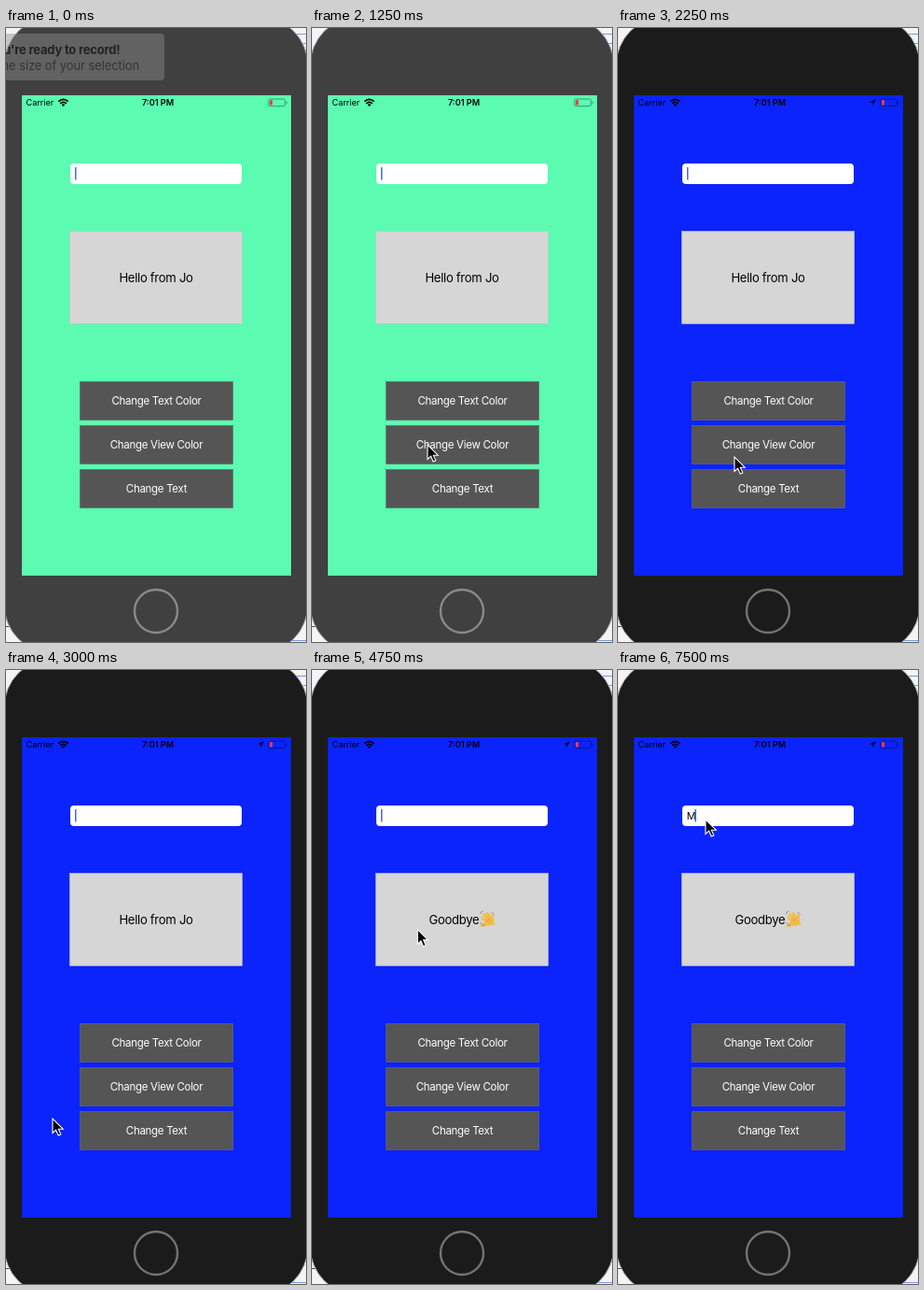
Write an HTML page that moves like this. It is 322 px wide and 657 px high and loops after 8000 ms.

```html
<!DOCTYPE html>
<html lang="en">
<head>
<meta charset="utf-8">
<style>
  html, body { margin: 0; height: 100%; overflow: hidden; background: #f4f4f4; }
  svg { display: block; width: 322px; height: 657px; font-family: Inter, Roboto, sans-serif; }
  .label { font-size: 13.1px; letter-spacing: -.3px; }
  .button { font-size: 11.5px; letter-spacing: -.3px; fill: #fff; }
  .status { font-size: 9.1px; }
  .mid { text-anchor: middle; }
</style>
</head>
<body>
<svg viewBox="0 0 322 657">
  <path d="M306 6.5H322M310 16.5H322M306 655.5H322" stroke="#6f9be8"/>
  <path d="M0 640.5H4" stroke="#444"/>
  <rect id="body" x="-2" y="-12" width="326" height="681" rx="52" stroke="#b5b5b5"/>
  <circle id="home" cx="161" cy="624" r="23" fill="none" stroke-width="2.4"/>
  <rect id="screen" x="17" y="72" width="289" height="514"/>

  <text class="status" x="21.5" y="83">Carrier</text>
  <g fill="none" stroke="#000" stroke-width="1.6">
    <path d="M56.3 78.6Q61.5 74 66.7 78.6M58.2 80.8Q61.5 78 64.8 80.8"/>
  </g>
  <path d="M59.6 82Q61.5 80.4 63.4 82L61.5 84Z"/>
  <text class="status mid" x="163" y="83" font-weight="600">7:01 PM</text>
  <path id="arrow" d="M277 76L270 79.4H273.4V83Z"/>
  <g id="battery">
    <rect x="281.8" y="76" width="17.6" height="7.6" rx="1.6" fill="none"/>
    <path d="M301.2 78.5V81.2" fill="none"/>
  </g>
  <rect x="283" y="77.2" width="3" height="5.2" fill="#fb3b3f"/>

  <rect x="69" y="145" width="184" height="22" rx="4" fill="#fff"/>
  <text id="typed" x="73.8" y="159.8" font-size="11">M</text>
  <rect id="caret" y="149" width="1.5" height="13.5" fill="#4368e8"/>

  <rect x="68.5" y="217.5" width="185" height="99" fill="#d6d6d6" stroke="#c4c4c4" stroke-width=".6"/>
  <text id="hello" class="label mid" x="161" y="272">Hello from Jo</text>
  <g id="bye">
    <text class="label" x="125.5" y="272">Goodbye</text>
    <g fill="none" stroke="#f3bd48" stroke-linecap="round" stroke-width="2.7">
      <path d="M183 265L190 272M184.5 261.5L191 268M188 260.5L193 266M193.8 263.5V269"/>
      <path d="M188.5 270.5L191 268L192 270Z" stroke-width="6.5"/>
    </g>
    <path d="M180.5 261Q181 258.5 183.5 258M180.8 270Q182 273 185 274M192.5 259.5Q194.5 260 195.5 262" fill="none" stroke="#888" stroke-width=".9"/>
    <path d="M186 266L190.5 270.5M188 264.5L192 268.5" stroke="#d08d2b" stroke-width=".6"/>
  </g>

  <g id="buttons"></g>

  <g id="banner">
    <rect x="-20" y="6" width="190" height="50" rx="4" fill="#8c8c8c" fill-opacity=".45"/>
    <g text-anchor="end">
      <text x="122.5" y="27.5" font-size="13" font-weight="700" letter-spacing="-.2" fill="#222">You're ready to record!</text>
      <text x="143" y="45" font-size="13" letter-spacing="-.1" fill="#353535">Change the size of your selection</text>
    </g>
  </g>
  <path id="cursor" d="M0 0V15.5L3.6 12.2L6.2 18L8.8 16.9L6.3 11.2H11.2Z" stroke="#fff" stroke-width="1.1"/>
</svg>
<script>
const LOOP = 8000, STEP = 250, BLINK = 950;
const TAP_COLOR = 1500, TAP_TEXT = 4000, TYPE = 7500;
const $ = id => document.getElementById(id);
const set = (id, attrs) => {
  for (const name in attrs) $(id).setAttribute(name, attrs[name]);
};
const show = (id, opacity) => set(id, { opacity: Number(opacity) });

$('buttons').innerHTML = ['Change Text Color', 'Change View Color', 'Change Text'].map((text, i) => `
  <rect x="79.5" y="${378.5 + 47 * i}" width="164" height="41" fill="#555" stroke="#666" stroke-width=".7"/>
  <text id="button${i}" class="button mid" x="161.5" y="${403.3 + 47 * i}">${text}</text>`).join('');

// Pointer stops: time, x, y
const stops = [
  [750, 150, 330], [1000, 164, 410], [1250, 124, 446], [1500, 130, 452], [1750, 130, 452],
  [2250, 125, 459], [2500, 125, 459], [3000, 50, 480], [3500, 132, 494], [3750, 154, 495],
  [4250, 154, 495], [5000, 93, 169], [5500, 94, 160], [LOOP, 94, 160]
];

function pointerAt(t) {
  const next = Math.max(1, stops.findIndex(s => s[0] > t));
  const [t0, x0, y0] = stops[next - 1], [t1, x1, y1] = stops[next];
  const k = Math.max(0, (t - t0) / (t1 - t0));
  return [x0 + (x1 - x0) * k, y0 + (y1 - y0) * k];
}

function caretAt(t) {
  if (t >= TYPE) return 1;
  const phase = (t - 1450 + 2 * BLINK) % BLINK;
  return phase < 70 ? 1 - phase / 70 : Math.min(1, Math.max(0, (phase - 400) / 50));
}

function draw(now) {
  const t = Math.floor(now % LOOP / STEP) * STEP;
  const blue = t >= TAP_COLOR, bye = t >= TAP_TEXT, typed = t >= TYPE;
  set('body', { fill: blue ? '#1b1b1b' : '#404040' });
  set('home', { stroke: blue ? '#747474' : '#8a8a8a' });
  set('screen', { fill: blue ? '#0a24fb' : '#5bfbb1' });
  set('battery', { stroke: blue ? '#071799' : '#3b9b70' });
  set('caret', { x: typed ? 82.5 : 74, opacity: caretAt(t) });
  set('cursor', { transform: `translate(${pointerAt(t)})` });
  show('cursor', t >= stops[0][0]);
  show('arrow', blue);
  show('hello', !bye);
  show('bye', bye);
  show('typed', typed);
  show('banner', t < STEP ? 1 : t < 2 * STEP ? .4 : 0);
  show('button1', t === TAP_COLOR ? .2 : 1);
  show('button2', t === TAP_TEXT ? .2 : 1);
}

function tick() {
  draw(performance.now());
  requestAnimationFrame(tick);
}
tick();
</script>
</body>
</html>
```
